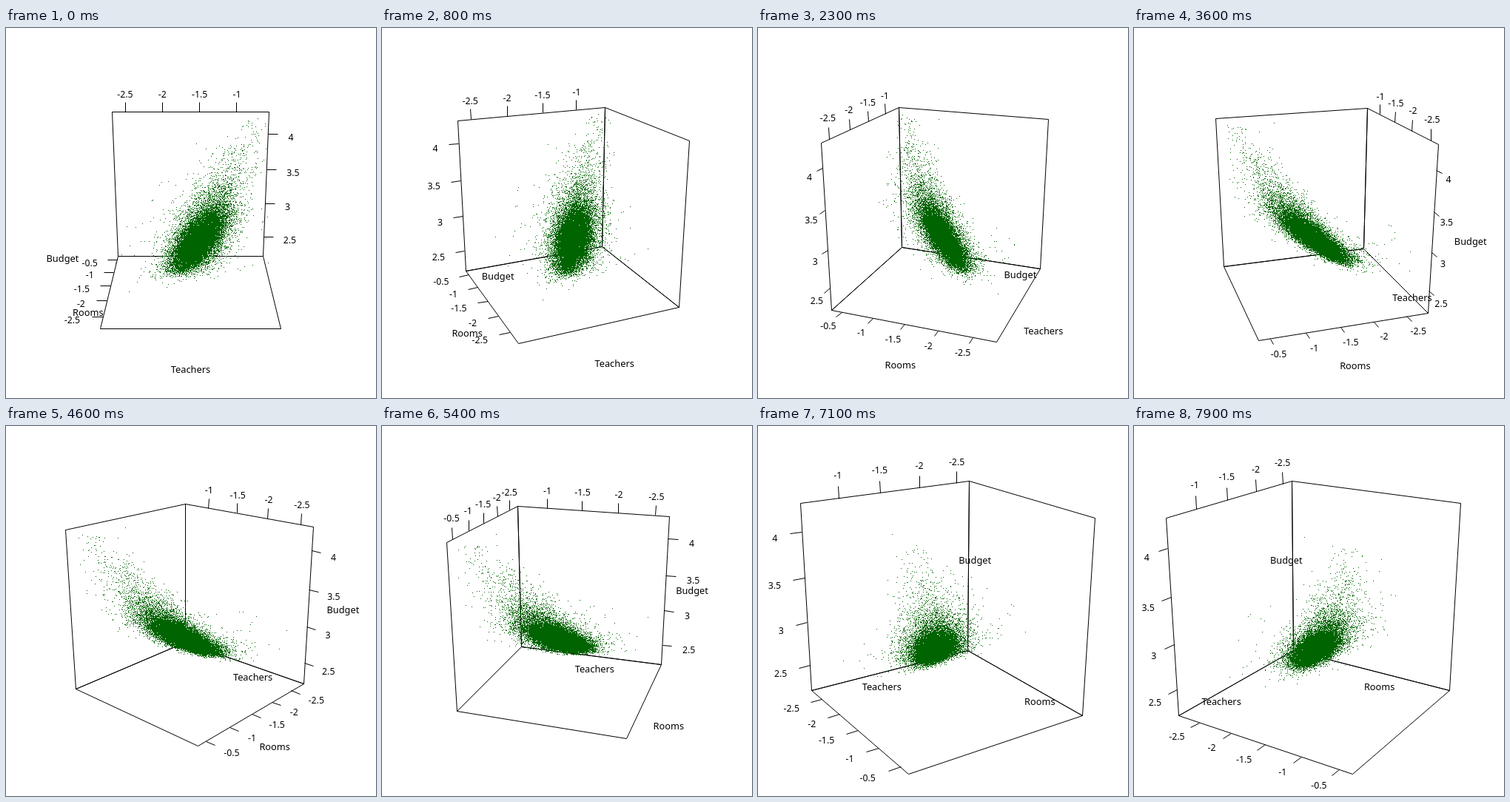
Write an HTML page with a canvas that moves like this. It is 500 by 500 pixels and loops after 8000 ms.

```html
<!DOCTYPE html>
<html lang="en">
<head>
<meta charset="utf-8">
<title>Rotating scatter plot</title>
<style>
  html, body { margin: 0; width: 100%; height: 100%; overflow: hidden; background: #fff; }
  canvas { display: block; width: 500px; height: 500px; }
</style>
</head>
<body>
<canvas id="stage" width="500" height="500"></canvas>
<script>
const ctx = document.getElementById('stage').getContext('2d');

const STEP_MS = 100, STEPS = 80, DEG_PER_STEP = 3;
const MID = 249.5, DIST = 8.224, FOCAL = 250 / Math.tan(Math.PI / 12);
const PITCH_SIN = Math.sin(Math.PI / 9), PITCH_COS = Math.cos(Math.PI / 9);
const TICK = 0.125, LABEL = 0.25, EPS = 1e-6;
const FONT = '"Noto Sans", "Open Sans", sans-serif';

// Data value to cube coordinate (-1..1)
const teachersAt = v => 0.585 + (v + 1) * 0.9433;
const budgetAt = v => (v - 3.25) * 0.955;
const roomsAt = v => -0.866 - (v + 0.5) * 0.8;

const TITLES = [
  ['Teachers', [0, -1.33, 1.29]],
  ['Rooms', [-1.29, -1.33, 0]],
  ['Budget', [-1.3, -0.02, 1.3]]
];

// Seeded random numbers
let seed = 20117;
function rand() {
  seed = (seed + 0x6D2B79F5) | 0;
  let r = Math.imul(seed ^ (seed >>> 15), 1 | seed);
  r = (r + Math.imul(r ^ (r >>> 7), 61 | r)) ^ r;
  return ((r ^ (r >>> 14)) >>> 0) / 4294967296;
}
const gauss = () => Math.sqrt(-2 * Math.log(1 - rand())) * Math.cos(2 * Math.PI * rand());
const expo = mean => -Math.log(1 - rand()) * mean;

const CENTRE = [0.06, -0.44, 0.02];
const MAIN = [0.25, 0.18, -0.29];
const SIDE = [0.29, -0.14, 0.25];
const TAIL = [0.49, 0.93, -0.58];

// Points below the soft, slanted floor are folded back above it
function fold([x, y, z]) {
  const slanted = -0.54 - 0.1 * x - 0.45 * z;
  const floor = Math.max(slanted, -0.64) + gauss() * 0.02;
  return [x, y < floor ? 2 * floor - y : y, z];
}

function makeCloud() {
  const cloud = [[0.73, 0.95, -0.33], [0.97, 0.56, -0.85]];
  const add = (count, along, across, height, tail) => {
    for (let i = 0; i < count; i++) {
      const u = gauss() * along, v = gauss() * across, t = expo(tail);
      const p = CENTRE.map((c, k) => c + MAIN[k] * u + SIDE[k] * v + TAIL[k] * t);
      p[1] += gauss() * height;
      const q = fold(p);
      if (q.every(c => Math.abs(c) < 0.95)) cloud.push(q);
    }
  };
  add(13000, 0.48, 0.2, 0.06, 0.06);
  add(5500, 0.65, 0.36, 0.08, 0.13);
  add(1900, 0.5, 0.34, 0.1, 0.36);
  add(500, 1.1, 0.75, 0.12, 0.2);
  return cloud;
}
const cloud = makeCloud();

let sin = 0, cos = 1, focal = FOCAL;

function project([x, y, z]) {
  const rx = x * cos + z * sin;
  const rz = z * cos - x * sin;
  const scale = focal / (DIST - rz * PITCH_COS - y * PITCH_SIN);
  return [MID + rx * scale, MID - (y * PITCH_COS - rz * PITCH_SIN) * scale];
}

function path(points, closed) {
  ctx.beginPath();
  for (const p of points) {
    const [x, y] = project(p);
    ctx.lineTo(Math.floor(x) + 0.5, Math.floor(y) + 0.5);
  }
  if (closed) ctx.closePath();
  ctx.stroke();
}

function text(str, x, y, size, weight = 400) {
  ctx.font = `${weight} ${size}px ${FONT}`;
  ctx.fillText(str, x, y + 5);
}

const smooth = v => v * v * (3 - 2 * v);

// Ticks and numbers along one edge; dir points away from the box
function axis(values, place, dir) {
  for (const v of values) {
    const p = place(v);
    const out = d => p.map((c, k) => c + dir[k] * d);
    path([p, out(TICK)]);
    let [x, y] = project(out(LABEL));
    const str = String(v);
    ctx.font = `400 12.3px ${FONT}`;
    if (dir[1]) {
      y += 1.5;
    } else {
      const side = dir[0] * cos, push = smooth(Math.abs(side));
      x += Math.sign(side) * push * (ctx.measureText(str).width / 2 + 1.3);
      y += p[1] === -1 ? 5 - 2 * push : 3.2;
    }
    text(str, x, y, 12.3, v === 4 ? 500 : 400);
  }
}

function drawBox() {
  const quad = (a, b, c, d) => path([a, b, c, d], true);
  quad([-1, -1, -1], [1, -1, -1], [1, -1, 1], [-1, -1, 1]);
  if (Math.abs(cos) > EPS) {
    const z = -Math.sign(cos);
    quad([-1, -1, z], [1, -1, z], [1, 1, z], [-1, 1, z]);
  }
  if (Math.abs(sin) > EPS) {
    const x = Math.sign(sin);
    quad([x, -1, -1], [x, -1, 1], [x, 1, 1], [x, 1, -1]);
  }
}

function drawAxes() {
  const flat = Math.abs(sin) < EPS;
  const front = sin > EPS ? -1 : 1;
  const back = cos > EPS ? -1 : 1;
  axis([-2.5, -2, -1.5, -1], v => [teachersAt(v), 1, back], [0, 1, 0]);
  axis([2.5, 3, 3.5, 4], v => [front, budgetAt(v), back], [front, 0, 0]);

  // The depth axis sits on whichever outline edge is nearer
  const low = flat || Math.abs(sin) * PITCH_COS > PITCH_SIN;
  const x = flat ? -1 : low ? front : -front;
  axis([-2.5, -2, -1.5, -1, -0.5], v => [x, low ? -1 : 1, roomsAt(v)],
    low ? [x, 0, 0] : [0, 1, 0]);
}

function draw(step) {
  const angle = step * DEG_PER_STEP * Math.PI / 180;
  sin = Math.sin(angle);
  cos = Math.cos(angle);
  const clicks = Math.max(0, Math.min(4, step - 65));
  focal = FOCAL * 1.05 ** clicks;

  ctx.fillStyle = '#fff';
  ctx.fillRect(0, 0, 500, 500);
  ctx.strokeStyle = '#000';
  ctx.lineWidth = 1;
  ctx.textAlign = 'center';
  drawBox();

  ctx.fillStyle = '#006400';
  for (const p of cloud) {
    const [x, y] = project(p);
    ctx.fillRect(Math.floor(x), Math.floor(y), 1, 1);
  }

  ctx.fillStyle = '#000';
  drawAxes();
  for (const [name, p] of TITLES) text(name, ...project(p), 12.8);
}

const start = performance.now();
let shown = -1;
function tick() {
  const step = Math.floor((performance.now() - start) / STEP_MS) % STEPS;
  if (step !== shown) draw(shown = step);
  requestAnimationFrame(tick);
}
tick();
</script>
</body>
</html>
```
